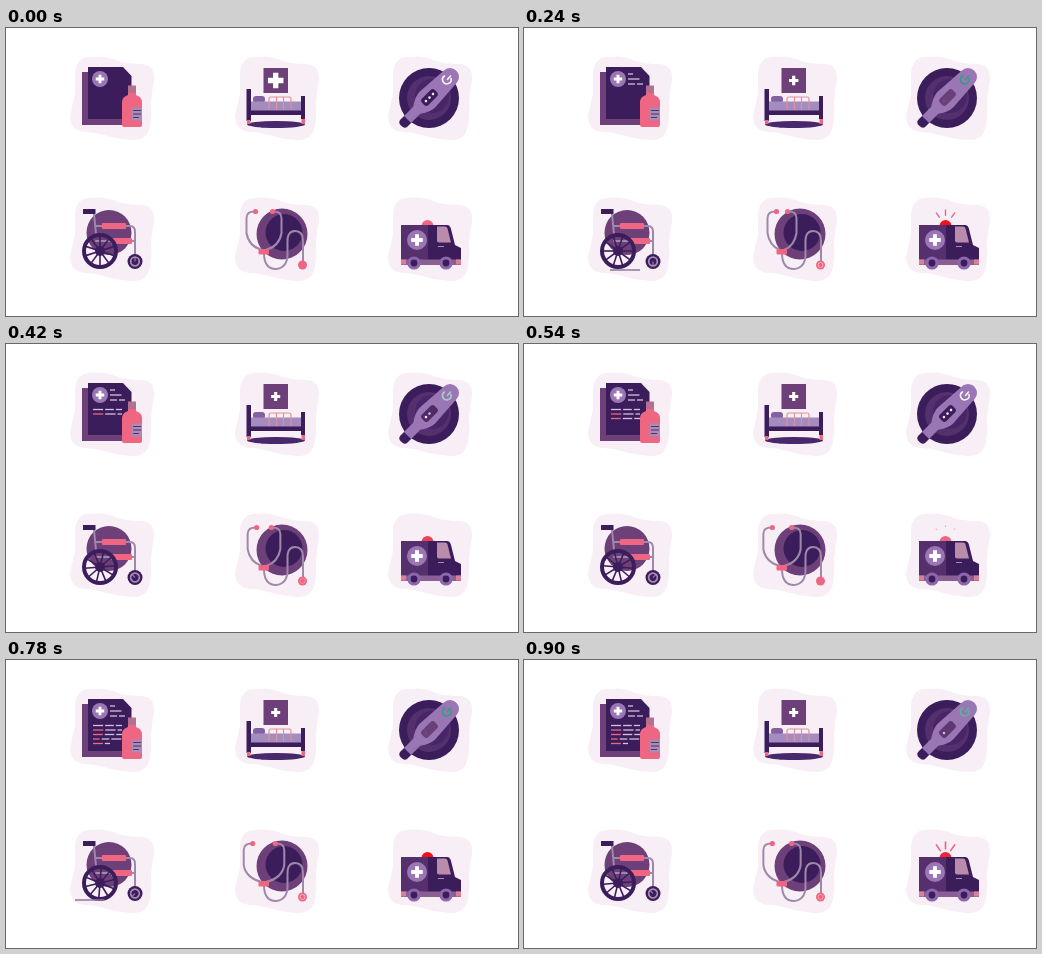
An HTML page for the animation above (960 ms loop, 512 by 288 pixels).

```html
<!DOCTYPE html>
<html lang="en">
<head>
<meta charset="utf-8">
<title>Medical icons</title>
<style>
  html, body { margin: 0; width: 100%; height: 100%; overflow: hidden; background: #fff; }
  svg { display: block; width: 100vw; height: 100vh; }
  .dark { fill: #3b1d5c; }
  .plum { fill: #6d4079; }
  .lilac { fill: #9a76b4; }
  .coral { fill: #ee6682; }
  .line { fill: none; stroke: #a088ab; stroke-width: 2; stroke-linecap: round; }
</style>
</head>
<body>
<svg viewBox="0 0 512 288">
  <defs>
    <path id="blob" fill="#f8eff6" d="M82 29Q100 27 112 33Q122 36 136 36Q149 37 148 52Q146 62 145 75Q146 85 144 98Q141 113 126 112Q110 111 98 107Q88 104 78 104Q64 102 64 88Q66 78 69 66Q69 56 69 44Q71 30 82 29Z"/>
    <path id="cross" stroke="#fff" stroke-width="3.4" d="M-5 0H5M0-5V5"/>
  </defs>
  <g id="blobs"></g>

  <!-- Record and bottle -->
  <path class="plum" d="M76 44h45v53H76z"/>
  <path class="dark" d="M82 39h35l8.500 9v43H82z"/>
  <circle class="lilac" cx="94" cy="51" r="8"/>
  <use href="#cross" transform="translate(94 51) scale(.85)"/>
  <g id="rows" stroke-width="1.300"></g>
  <path fill="#b3708f" d="M122 57.500h8v8h-8z"/>
  <path class="coral" d="M122 65h8v2q6 2 6 7v23q0 2-2 2h-16q-2 0-2-2V74q0-5 6-7z"/>
  <path fill="#a98bb5" d="M126 79.500h10v13h-10z"/>
  <path stroke="#53316c" d="M127 82.500h8M127 86h8M127 89.500h6"/>

  <!-- Bed -->
  <path class="plum" d="M257.500 40H282v25h-24.500z"/>
  <use id="beat" href="#cross"/>
  <ellipse cx="270" cy="96.500" rx="29" ry="3.500" fill="#47286a"/>
  <rect x="247" y="68" width="12" height="7" rx="3" fill="#8361a0"/>
  <path fill="#a58cbf" d="M244 73.500h51V83h-51z"/>
  <path fill="none" stroke="#dd9299" stroke-width="1.200" d="M263 82V71q0-2 2-2h18q2 0 2 2v11M270.500 69v13M277.500 69v13"/>
  <path class="dark" d="M240.500 61h4.500v21.500h50V68h4v23h-4v-4h-50v6h-4.500z"/>
  <path class="coral" d="M241 92h3.500v4H241zM295.500 91h3.500v5h-3.500z"/>

  <!-- Thermometer -->
  <circle class="dark" cx="423" cy="70" r="30"/>
  <circle cx="423" cy="70" r="22" fill="#54306f"/>
  <circle cx="426" cy="68" r="17" fill="#472567"/>
  <g transform="translate(444 49) rotate(45)">
    <path class="dark" d="M-5 54H5v11q0 4-5 4t-5-4z"/>
    <path class="lilac" d="M-9 0A9 9 0 0 1 9 0L11 32Q11 38 5 47V60H-5V47Q-11 38-11 32z"/>
    <rect id="display" x="-4.500" y="20" width="9" height="18" rx="3"/>
    <g id="dots" fill="#f4e6f2"><circle cy="34" r="1.300"/><circle cy="29" r="1.300"/><circle cy="24" r="1.300"/></g>
  </g>
  <path id="power" fill="none" stroke-width="1.600" stroke-linecap="round" d="M438.500 48a4.300 4.300 0 1 0 6.500 2.500M441.500 51.500l3-3.500"/>

  <!-- Wheelchair -->
  <circle class="plum" cx="103" cy="204.500" r="22.500"/>
  <path class="line" d="M88 186l2 20M90 198h34q5 0 5 6v25M90 213h38"/>
  <path class="dark" d="M77 181h12.500v5H77z"/>
  <rect class="coral" x="96" y="195" width="24" height="6" rx="1"/>
  <rect class="coral" x="105" y="210" width="21" height="6" rx="1"/>
  <circle cx="94" cy="223" r="16" fill="none" stroke="#3b1d5c" stroke-width="4"/>
  <g id="spokes" stroke="#3b1d5c" stroke-width="1.600"></g>
  <circle class="dark" cx="94" cy="223" r="5"/>
  <circle class="dark" cx="129" cy="233.500" r="7.500"/>
  <g id="caster" stroke="#a98bb5"><circle r="4.300" fill="none" stroke-width="1.800"/><path d="M0 0v-4"/></g>
  <path id="ground" stroke="#8f799b" stroke-width="1.500"/>

  <!-- Stethoscope -->
  <circle class="plum" cx="276" cy="206" r="25.500"/>
  <circle class="dark" cx="278" cy="204.500" r="18.500"/>
  <path id="tubes" class="line"/>
  <path class="line" d="M258 225Q258 241 270 241Q281 240 281.500 227V215Q281 203 289 203Q297 203 297 213V233"/>
  <rect class="coral" x="252.500" y="221" width="10.500" height="5.500" rx="1"/>
  <circle id="earL" class="coral" cy="183.500" r="2.600"/>
  <circle id="earR" class="coral" cy="183.500" r="2.600"/>
  <circle class="coral" cx="296.500" cy="237" r="4.500"/>
  <circle id="chest" cx="296.500" cy="237" r="2.500" fill="none" stroke="#f5b3c0"/>

  <!-- Ambulance -->
  <path id="siren" d="M415.500 198a6 6 0 0 1 12 0z"/>
  <g id="rays" stroke="#e8637f" stroke-linecap="round"></g>
  <path class="dark" d="M395 197h46q3 0 4 4l4 16 6 3v17h-60z"/>
  <path fill="#56306d" d="M395 197h27v35h-27z"/>
  <path fill="#b98cac" d="M431 198.500h8q2 0 2.500 2l3.500 14h-12q-2 0-2-2z"/>
  <path fill="#8a5f93" d="M395 231.500h60v5.500h-60z"/>
  <path fill="#d98095" d="M395 231.500h5v5h-5zM450 231.500h5v5h-5z"/>
  <path stroke="#a98bb5" d="M432 218.500h6"/>
  <circle class="lilac" cx="411" cy="212" r="10"/>
  <use href="#cross" transform="translate(411 212) scale(1.150)"/>
  <g class="dark" stroke="#8e66ac" stroke-width="3.200">
    <circle cx="408" cy="235" r="5"/><circle cx="440" cy="235" r="5"/>
  </g>
</svg>
<script>
const LOOP = 960, STEP = 60, TURN = 2 * Math.PI;
const $ = id => document.getElementById(id);
const set = (id, name, value) => $(id).setAttribute(name, value);
const repeat = (n, make) => Array.from({ length: n }, (_, i) => make(i)).join('');
const clamp = v => Math.max(0, Math.min(1, v));
const mix = (a, b, k) => `rgb(${a.map((v, i) => Math.round(v + (b[i] - v) * k))})`;

let seed = 7;
const random = () => (seed = seed * 16807 % 2147483647) / 2147483647;

// A written row: dashes of uneven length, the first one tinted.
function row(x, y, end, first) {
  let out = '';
  for (let color = first; x < end - 3; color = '#d5c0dd') {
    const stop = Math.min(end, x + 5 + 7 * random());
    out += `<path stroke="${color}" d="M${x} ${y}H${stop}"/>`;
    x = stop + 2;
  }
  return `<g>${out}</g>`;
}

$('blobs').innerHTML = repeat(6, i =>
  `<use href="#blob" x="${[0, 165, 318][i % 3]}" y="${i < 3 ? 0 : 141}"/>`);
$('rows').innerHTML =
  repeat(3, i => row(104, 46 + 5 * i, i ? 119 : 112, '#d5c0dd')) +
  repeat(5, i => row(87, 65.5 + 4.5 * i, i < 4 ? 116 : 104, i ? '#ee6682' : '#d5c0dd'));
$('spokes').innerHTML = repeat(10, i => `<path d="M0 0V-15" transform="rotate(${36 * i})"/>`);
$('rays').innerHTML = repeat(3, i => `<path transform="translate(421.500 198) rotate(${35 * (i - 1)})"/>`);

function draw(t) {
  const pulse = Math.sin(Math.PI * t / 540) ** 2;

  [...$('rows').children].forEach((r, i) => {
    const start = i < 3 ? 60 * (i + 1) : 300 + 90 * (i - 3);
    r.style.opacity = t >= start ? 1 : 0;
  });

  set('beat', 'transform', `translate(269.700 52.500) scale(${.9 + .65 * Math.exp(-t / 90)})`);

  set('power', 'stroke', mix([250, 242, 250], [42, 157, 125], pulse));
  set('display', 'fill', mix([59, 29, 92], [109, 64, 121], pulse));
  [...$('dots').children].forEach((dot, i) => dot.style.opacity = clamp(3 * (1 - pulse) - i));

  set('spokes', 'transform', `translate(94 223) rotate(${t / LOOP * 360})`);
  set('caster', 'transform', `translate(129 233.500) rotate(${t / LOOP * 720})`);
  // The ground mark slides left under the chair, a little higher on its second pass.
  const right = 200 - .35 * (t % 490);
  const x0 = Math.max(69, right - 30), x1 = Math.min(141, right);
  set('ground', 'd', x1 > x0 ? `M${x0} ${t < 490 ? 242 : 240}H${x1}` : '');

  const spread = 8.5 - 3 * Math.sin(t / LOOP * TURN);
  const tube = side => {
    const ear = 258 + side * spread, x = ear + 9 * side;
    return `M${ear} 183.500Q${x} 183 ${x} 190V205Q${x - 2 * side} 218 ${258 + 2 * side} 222`;
  };
  set('earL', 'cx', 258 - spread);
  set('earR', 'cx', 258 + spread);
  set('tubes', 'd', tube(-1) + tube(1));
  set('chest', 'opacity', pulse);

  set('siren', 'fill', mix([238, 102, 130], [245, 12, 24], pulse));
  const flash = Math.max(...[270, 650, 900].map(peak => clamp(1 - Math.abs(t - peak) / 120)));
  set('rays', 'stroke-width', .6 + flash);
  for (const ray of $('rays').children) ray.setAttribute('d', flash ? `M0-16v${7 * flash}` : '');
}

function tick() {
  draw(Math.floor(performance.now() % LOOP / STEP) * STEP);
  requestAnimationFrame(tick);
}
tick();
</script>
</body>
</html>
```
